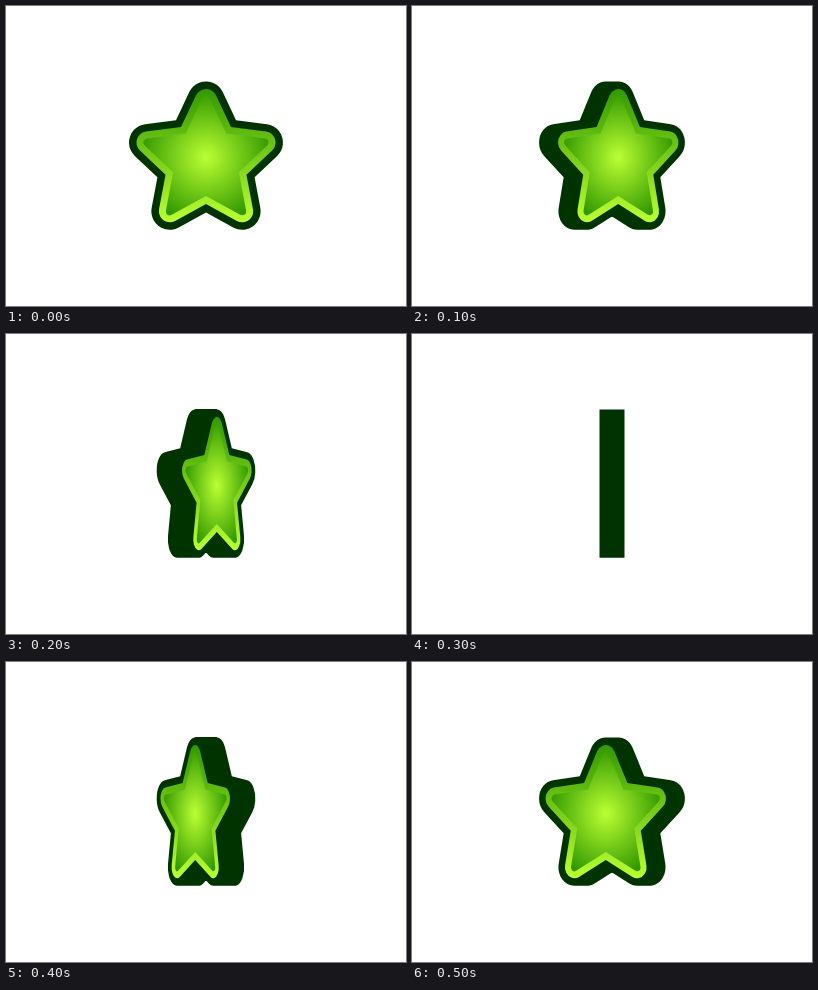
Animation, 400 px wide and 300 px high, one loop 0.6 s. Source, as an HTML page with a canvas:

```html
<!DOCTYPE html>
<html lang="en">
<head>
<meta charset="utf-8">
<title>Spinning star</title>
<style>
  html, body { margin: 0; height: 100%; overflow: hidden; background: #fff; }
  canvas { display: block; }
</style>
</head>
<body>
<canvas id="stage" width="400" height="300"></canvas>
<script>
const ctx = document.getElementById('stage').getContext('2d');
const LOOP = 600, STEPS = 6;
const CX = 200, CY = 155.5;
const TIP = 61.5, NOTCH = 30;   // radii of the skeleton star
const HALF_DEPTH = 12.5;
const RIM = 18.5;

// Skeleton star grown outwards by r: round tips, sharp notches.
function star(r) {
  const path = new Path2D();
  const turn = Math.PI / 5;
  const run = TIP * Math.sin(turn), rise = TIP * Math.cos(turn) - NOTCH;
  const spread = Math.PI / 2 + Math.atan2(rise, run) - 3 * Math.PI / 10;
  const notch = NOTCH + r * Math.hypot(run, rise) / run;
  for (let i = 0; i < 5; i++) {
    const a = -Math.PI / 2 + 2 * turn * i;
    path.arc(TIP * Math.cos(a), TIP * Math.sin(a), r, a - spread, a + spread);
    path.lineTo(notch * Math.cos(a + turn), notch * Math.sin(a + turn));
  }
  path.closePath();
  return path;
}

function shade(gradient, from, to) {
  gradient.addColorStop(0, from);
  gradient.addColorStop(1, to);
  return gradient;
}

const body = star(RIM), ring = star(11), face = star(4);
const ringFill = shade(ctx.createLinearGradient(0, -72, 0, 61), '#339900', '#bbff33');
const faceFill = shade(ctx.createRadialGradient(0, -4, 0, 0, -4, 66), '#bbff33', '#339900');

function draw(angle) {
  const cos = Math.cos(angle);
  const width = Math.abs(cos);
  const shift = HALF_DEPTH * Math.sin(angle) * (cos < 0 ? -1 : 1);

  ctx.setTransform(1, 0, 0, 1, 0, 0);
  ctx.clearRect(0, 0, 400, 300);
  ctx.translate(CX, CY);
  ctx.fillStyle = '#003300';

  if (width < 0.001) {
    const top = -TIP - RIM, bottom = TIP * Math.cos(Math.PI / 5) + RIM;
    ctx.fillRect(-HALF_DEPTH, top, 2 * HALF_DEPTH, bottom - top);
    return;
  }

  // Sweep the outline from back to front as one shape.
  const solid = new Path2D();
  const slices = Math.ceil(Math.abs(shift) * 4) + 1;
  for (let i = 0; i <= slices; i++) {
    const x = shift * (2 * i / slices - 1);
    solid.addPath(body, new DOMMatrix([width, 0, 0, 1, x, 0]));
  }
  ctx.fill(solid);

  ctx.translate(shift, 0);
  ctx.scale(width, 1);
  ctx.fillStyle = ringFill;
  ctx.fill(ring);
  ctx.fillStyle = faceFill;
  ctx.fill(face);
}

// Half a turn per loop, in even steps.
function tick(time) {
  const step = Math.floor(time % LOOP / LOOP * STEPS);
  draw(Math.PI * step / STEPS);
  requestAnimationFrame(tick);
}

draw(0);
requestAnimationFrame(tick);
</script>
</body>
</html>
```
